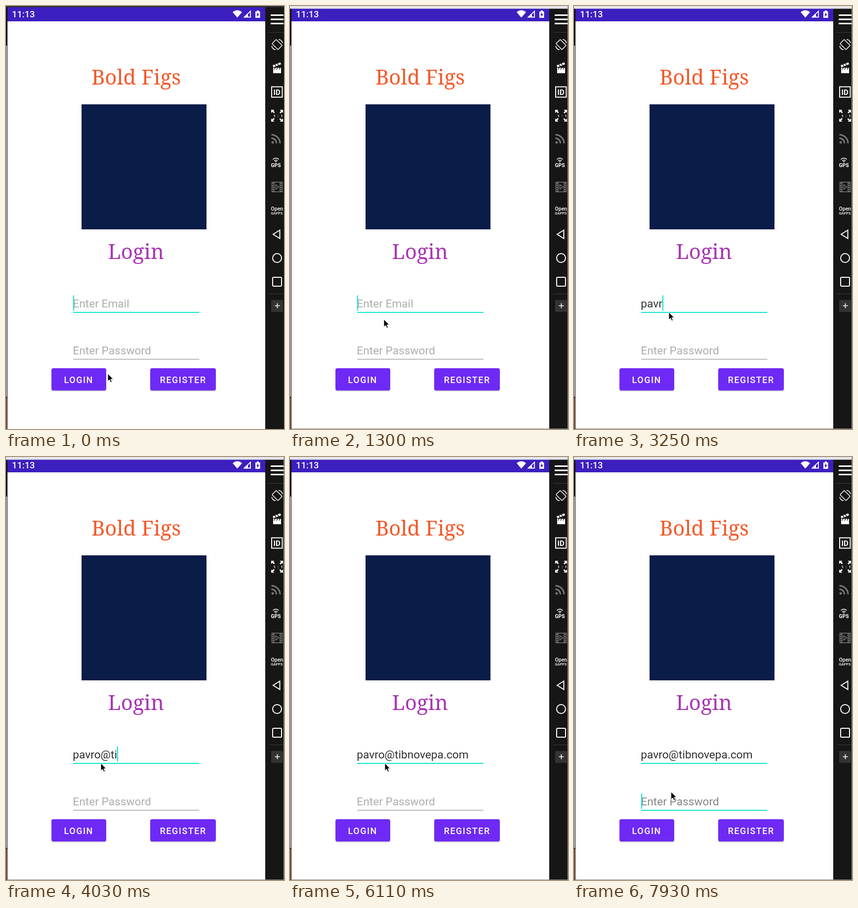
An HTML page that plays this animation: 563x856 px, repeating every 8000 ms.

```html
<!DOCTYPE html>
<html lang="en">
<head>
<meta charset="utf-8">
<title>Login screen</title>
<style>
  html, body { margin: 0; width: 100%; height: 100%; overflow: hidden; background: #fff; }
  svg { display: block; width: 563px; height: 856px; }
  text { font-family: Roboto, sans-serif; white-space: pre; }
  .title { font: 42px "Noto Serif", serif; text-anchor: middle; }
  .field { font-size: 22.7px; }
  .btn { font-size: 17.9px; font-weight: 500; letter-spacing: 1.57px; fill: #fff; }
  .line { fill: none; stroke: #fff; stroke-width: 2; }
  .thin { stroke-width: 1.5; }
  .tiny { fill: #fff; font-weight: 700; }
  .medium { font-weight: 500; }
</style>
</head>
<body>
<svg viewBox="0 0 563 856">
  <rect width="563" height="856" fill="#fff"/>

  <!-- window edge -->
  <rect width="3" height="80" fill="#111"/>
  <rect y="80" width="2" height="712" fill="#b4b4b4"/>
  <rect x="2" y="80" width="1" height="776" fill="#222"/>
  <rect y="792" width="2" height="64" fill="#8a5c40"/>
  <rect y="791" width="2" height="2" fill="#111"/>

  <!-- status bar -->
  <rect x="3" y="2" width="522" height="29" fill="#3c1fbf"/>
  <text x="12" y="23" font-size="18.300" font-weight="500" fill="#fff">11:13</text>
  <path d="M468.500 23.500 459 12.500Q468.500 4.500 478 12.500Z" fill="#fff"/>
  <path d="M495 10.500V22.500H482.500Z" fill="none" stroke="#fff" stroke-width="1.800"/>
  <path d="M490 15V23H481Z" fill="#fff"/>
  <path d="M505 11H508V9H512V11H514.500V24H505Z" fill="#fff"/>
  <path d="M510.500 12.500 507 18.500H509.300V22L512.800 16.500H510.500Z" fill="#3c1fbf"/>

  <!-- page -->
  <text class="title" x="263.500" y="159" fill="#f4592a">Bold Figs</text>
  <rect x="153" y="199" width="253" height="253" fill="#0a1c48"/>
  <text class="title" x="263.300" y="512" fill="#a834b4">Login</text>

  <text class="field" id="email" x="135.300" y="610"></text>
  <rect x="136" y="619" width="255.500" height="2" fill="#0ce5d0"/>
  <text class="field" id="hint" x="135.300" y="705">Enter Password</text>
  <rect id="rule" x="136" y="714" width="255.500"/>
  <rect id="caret" width="2" height="31" fill="#0ce5d0"/>

  <g id="buttons"></g>
  <text class="btn" x="117.600" y="762.500">LOGIN</text>
  <text class="btn" x="311.700" y="762.500">REGISTER</text>

  <!-- emulator toolbar -->
  <rect x="525" y="2" width="38" height="854" fill="#161616"/>
  <path d="M533 53.500H563M533 582.500H563" stroke="#3a3a3a"/>
  <path d="M536 18.500H562M536 27H562M536 35.500H562" stroke="#fff" stroke-width="3"/>

  <rect class="line thin" x="543" y="69.500" width="12" height="17" rx="1" transform="rotate(-45 549 78)"/>
  <path class="line thin" d="M552 67.500Q558.500 68.500 560 75M538 81Q539.500 87.500 546 88.500"/>

  <g fill="#fff">
    <path d="M541 125H557V136H541Z"/>
    <path d="M540 120 555.500 114 557 118 541.500 124Z"/>
    <path d="M544 118 547 121.500M549 116 552 119.500M545 125 543 128.500M550 125 548 128.500M555 125 553 128.500" stroke="#161616" stroke-width="1.500"/>
  </g>

  <rect class="line" x="538" y="163.500" width="21.500" height="21"/>
  <text class="tiny" x="541.500" y="179.500" font-size="15">ID</text>

  <g id="corners" fill="#fff"></g>
  <text class="tiny" x="541.500" y="225" font-size="8" letter-spacing="1">1 : 1</text>

  <g fill="none" stroke="#777" stroke-width="3">
    <circle cx="540" cy="276" r="2.500" fill="#777" stroke="none"/>
    <path d="M537.500 267.500A10 10 0 0 1 547.500 278M537.500 260.500A17.500 17.500 0 0 1 555 278"/>
  </g>

  <path class="line thin" d="M540.500 310.500Q546.500 305 552.500 310.500M543 313.500Q546.500 310.500 550 313.500"/>
  <circle cx="546.500" cy="315" r="1.300" fill="#fff"/>
  <text class="tiny" x="536.500" y="325.500" font-size="10.400">GPS</text>

  <g fill="none" stroke="#777" stroke-width="1.500">
    <rect x="538.500" y="356.500" width="21" height="19.500"/>
    <path d="M543 357V376M555 357V376M546.500 361.500 552.500 366 546.500 370.500Z"/>
    <path d="M540.800 358V376M557.200 358V376" stroke-width="2.500" stroke-dasharray="2 2"/>
  </g>

  <text class="tiny medium" x="536.500" y="414" font-size="10.500">Open</text>
  <text class="tiny medium" x="536.500" y="422" font-size="7.400">GAPPS</text>

  <path class="line" d="M541 462 554.500 453.500V470.500Z"/>
  <circle class="line" cx="549" cy="510" r="9"/>
  <rect class="line" x="540" y="549" width="18" height="18" rx="2"/>
  <rect x="537" y="595" width="24" height="24" rx="1" fill="#333"/>
  <path d="M544.500 606.500H554.500M549.500 601.500V611.500" stroke="#fff" stroke-width="1.600"/>

  <!-- top strip and frame -->
  <rect id="strip" width="563"/>
  <path id="frame" d="M562.500 0V856M3 855.500H563" fill="none" stroke="#8c8c8c"/>

  <path id="mouse" d="M0 0V15.500L3.600 12.200 6 17.700 8.500 16.600 6.200 11.300H11Z" fill="#000" stroke="#fff"/>
</svg>

<script>
const LOOP = 8000, STEP = 130;
const ADDRESS = 'pavro@tibnovepa.com';
const TEAL = '#0ce5d0';
const STRIP_AT = 650, FOCUS_AT = 7540;

// typing times, counted in steps
const KEYS = [15, 18, 21, 24, 26, 29, 30, 31, 32, 33, 34, 35, 36, 36, 37, 39, 40, 41, 42].map(n => n * STEP);

// pointer stops: time, x, y
const PATH = [
  [0, 206, 744], [130, 206, 744], [1040, 190, 634], [1430, 190, 634],
  [1690, 192, 619.5], [6760, 192, 619.5], [7410, 196.5, 677.5], [LOOP, 196.5, 677.5]
];

const $ = id => document.getElementById(id);
const set = (el, attrs) => { for (const k in attrs) el.setAttribute(k, attrs[k]); };
function add(parent, tag, attrs) {
  const el = document.createElementNS('http://www.w3.org/2000/svg', tag);
  set(el, attrs);
  parent.append(el);
}

for (const [x, width] of [[92, 111], [292, 133]]) {
  add($('buttons'), 'rect', { x, y: 735, width, height: 45, rx: 4, fill: '#000', opacity: .18 });
  add($('buttons'), 'rect', { x, y: 733, width, height: 45, rx: 4, fill: '#6e2af4' });
}
for (let turn = 0; turn < 4; turn++) {
  add($('corners'), 'path', {
    d: 'M537 210H543.5L541.5 212 544.500 215 542.500 217 539.500 214 537 216.500Z',
    transform: `rotate(${turn * 90} 549 222)`
  });
}

function pointer(t) {
  const i = PATH.findIndex(p => p[0] > t);
  const [t0, x0, y0] = PATH[i - 1], [t1, x1, y1] = PATH[i];
  const k = (t - t0) / (t1 - t0), e = k * k * (3 - 2 * k);
  return [x0 + (x1 - x0) * e, y0 + (y1 - y0) * e];
}

function draw(now) {
  const t = Math.floor(now % LOOP / STEP) * STEP;
  const typed = KEYS.filter(k => k <= t).length;
  const focused = t >= FOCUS_AT;
  const email = $('email');

  email.textContent = typed ? ADDRESS.slice(0, typed) : 'Enter Email';
  set(email, { fill: typed ? '#303030' : '#adadad' });
  set($('hint'), { fill: focused ? '#858585' : '#adadad' });
  set($('rule'), focused ? { height: 2, fill: TEAL } : { height: 1.5, fill: '#a8a8a8' });

  const since = focused ? FOCUS_AT : typed ? KEYS[typed - 1] : 0;
  const width = typed && !focused ? email.getComputedTextLength() : 0;
  set($('caret'), {
    x: Math.round(135.5 + width),
    y: focused ? 681 : 585.5,
    opacity: (t - since) % 1000 < 500 ? 1 : 0
  });

  const shown = t >= STRIP_AT;
  set($('strip'), { height: shown ? 5.5 : 2.5, fill: shown ? '#e6e6e9' : '#333' });
  set($('frame'), { opacity: shown ? 1 : 0 });
  set($('mouse'), { transform: `translate(${pointer(t)})` });
}

const start = performance.now();
function tick() {
  draw(performance.now() - start);
  requestAnimationFrame(tick);
}
tick();
</script>
</body>
</html>
```
